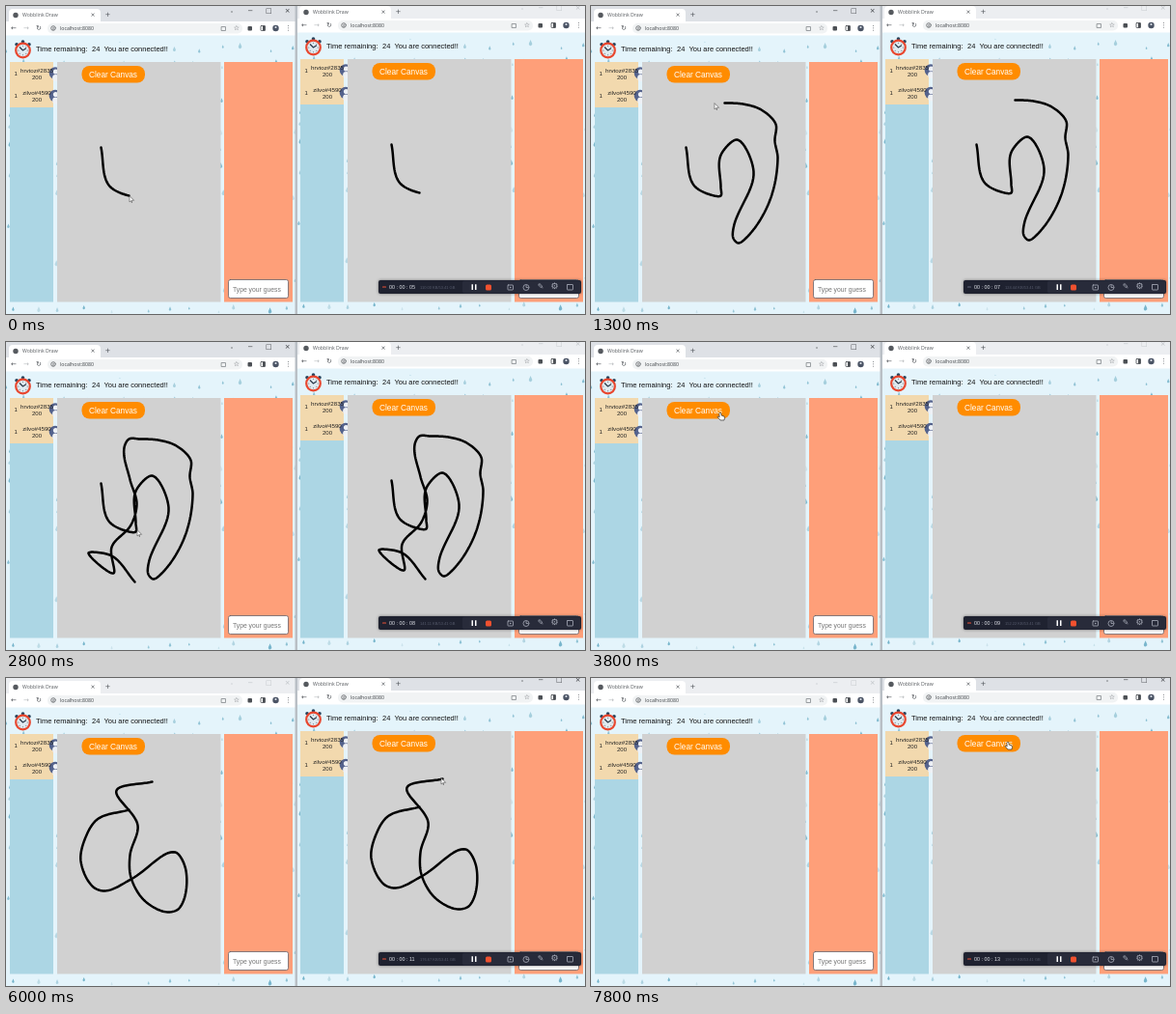
An HTML page with a canvas that plays this animation: 600 px wide and 319 px high, repeating every 8 s.

```html
<!DOCTYPE html>
<html lang="en">
<head>
<meta charset="utf-8">
<title>Shared drawing</title>
<style>
  html, body { margin: 0; width: 100%; height: 100%; overflow: hidden; }
  canvas { display: block; }
</style>
</head>
<body>
<canvas id="stage" width="600" height="319"></canvas>
<script>
const c = document.getElementById('stage').getContext('2d');
const LOOP = 8000, STEP = 100;
const SWITCH = 4800;               // the second window takes over
const CLEARS = [3800, 7800];
const DX = 301, DY = -3;           // second window relative to the first
const BOTTOM = 306.5;              // panels of both windows end here
const ARIAL = '"Liberation Sans", sans-serif';
const UI = '"Open Sans", sans-serif';
const SYMBOLS = '"DejaVu Sans", sans-serif';

// Drawing helpers
function paint(fill, border, width = .8) {
  if (fill) { c.fillStyle = fill; c.fill(); }
  if (border) { c.strokeStyle = border; c.lineWidth = width; c.stroke(); }
}
function box(x, y, w, h, fill, r = 0, border) {
  c.beginPath();
  c.roundRect(x, y, w, h, r);
  paint(fill, border);
}
function disc(x, y, r, fill, border, width) {
  c.beginPath();
  c.arc(x, y, r, 0, 7);
  paint(fill, border, width);
}
function line(points, color, width) {
  c.beginPath();
  points.forEach(p => c.lineTo(...p));
  paint(null, color, width);
}
function text(s, x, y, size, color, font = ARIAL, align = 'left', base = 'alphabetic') {
  c.font = `${size}px ${font}`;
  c.fillStyle = color;
  c.textAlign = align;
  c.textBaseline = base;
  c.fillText(s, x, y);
}
function symbol(s, x, y, size, color) {
  text(s, x, y, size, color, SYMBOLS, 'center', 'middle');
}

// Linear interpolation over [time, ...values] keys
function ramp(keys, t) {
  const i = keys.findIndex(k => k[0] > t);
  if (i < 0) return keys.at(-1).slice(1);
  if (i === 0) return keys[0].slice(1);
  const a = keys[i - 1], b = keys[i], f = (t - a[0]) / (b[0] - a[0]);
  return a.slice(1).map((v, j) => v + (b[j + 1] - v) * f);
}

// A smooth pen stroke through a few points, traced by length.
// pace says when the pen passes a point: [time, point index].
function makeStroke(points, pace) {
  const SUB = 16;
  const pts = points.split(' ').map(p => p.split(',').map(Number));
  const chords = pts.slice(1).map(([x, y], i) => Math.hypot(x - pts[i][0], y - pts[i][1]));
  const unit = (i, d) => (pts[i + 1][d] - pts[i][d]) / chords[i];
  // The mean of both directions fades out at sharp turns, which keeps corners
  const tangent = (i, d) =>
    (unit(Math.max(i - 1, 0), d) + unit(Math.min(i, chords.length - 1), d)) / 2;
  const path = [pts[0]], len = [0];
  chords.forEach((chord, i) => {
    for (let k = 1; k <= SUB; k++) {
      const s = k / SUB, r = 1 - s;
      const p = [0, 1].map(d => {
        const a = pts[i][d], b = pts[i + 1][d];
        const a2 = a + tangent(i, d) * chord / 3, b2 = b - tangent(i + 1, d) * chord / 3;
        return r * r * r * a + 3 * r * r * s * a2 + 3 * r * s * s * b2 + s * s * s * b;
      });
      const q = path.at(-1);
      len.push(len.at(-1) + Math.hypot(p[0] - q[0], p[1] - q[1]));
      path.push(p);
    }
  });
  const keys = pace.map(([t, i]) => [t, len[i * SUB]]);
  return t => {
    const [end] = ramp(keys, t);
    return path.filter((_, i) => len[i] <= end + .01);
  };
}

const firstStroke = makeStroke(
  '99,147 107,186 128,197 135,197 135,188 135,155 152,139 169,172 148,231 148,241 ' +
  '153,246 161,241 185,204 194,158 191,140 192,123 177,108 158,102 139,101 128,101 ' +
  '123,110 129,143 136,168 130,190 110,213 112,240 86,219 110,222 134,249',
  [[60, 2], [900, 14], [1300, 18], [2450, 28]]);

const secondStroke = makeStroke(
  '128,137 95,147 82,168 78,190 91,217 103,221 130,209 176,181 187,200 180,239 ' +
  '168,243 144,231 130,207 129,184 137,153 115,117 152,108',
  [[SWITCH - 50, 0], [5200, 5], [6000, 16]]);

function ink(t) {
  if (t < CLEARS[0]) return firstStroke(t);
  return t >= SWITCH && t < CLEARS[1] ? secondStroke(t) : [];
}

// The pointer runs a little ahead of the ink, then heads for the button
function pointer(t) {
  if (t < 2600) return firstStroke(t + 50).at(-1);
  if (t < SWITCH) return ramp([[2700, 134, 249], [2800, 136, 195], [3300, 134, 73],
    [4000, 134, 73], [4600, 429, 134]], t);
  if (t < 6000) {
    const [x, y] = secondStroke(t + 70).at(-1);
    return [x + DX, y + DY];
  }
  return ramp([[6000, 451, 104], [6800, 468, 98], [7400, 432, 66]], t);
}

function drawPointer(t) {
  const [x, y] = pointer(t);
  const over = [0, 1].some(k =>
    Math.abs(x - k * DX - 111) < 33 && Math.abs(y - k * DY - 71) < 9);
  const outline = over
    ? 'M-1 1Q0-1 1 1V3L4 4Q5 5 4 8H0L-3 4.5Q-2 3.5-1 4.5Z'
    : 'M0 0V6L1.500 4.700L2.500 6.800L2.500 4.300H4.200Z';
  c.save();
  c.translate(x, y);
  c.fillStyle = '#fff';
  c.strokeStyle = over ? '#333' : '#666';
  c.lineWidth = .7;
  c.fill(new Path2D(outline));
  c.stroke(new Path2D(outline));
  c.restore();
}

function drawDrops() {
  let seed = 7;
  const random = () => (seed = seed * 16807 % 2147483647) / 2147483647;
  for (let y = 40; y < 330; y += 17) for (let x = 0; x < 300; x += 26) {
    const px = x + random() * 20, py = y + random() * 8, r = .8 + random();
    c.beginPath();
    c.arc(px, py, r, -.3, Math.PI + .3);
    c.lineTo(px, py - 2.5 * r);
    c.closePath();
    paint(`hsl(196 45% ${62 + random() * 25}%)`);
  }
}

function drawBrowserBar(active) {
  const dark = '#4b4f54', control = active ? '#3c3f43' : '#bfc3c7';
  box(0, 0, 300, 17, active ? '#dee1e6' : '#eceef1');
  box(3, 3, 95, 14, '#fff', [4, 4, 0, 0]);
  disc(10, 9.5, 2.7, '#55595e');
  text('Wobblink Draw', 17, 11.4, 5.2, '#55595d', UI);
  symbol('×', 90, 9.5, 6, dark);
  symbol('+', 105.5, 9.5, 7, dark);
  [...'ˇ−□×'].forEach((s, i) => symbol(s, 234 + i * 19.2, i ? 5.5 : 9, 7, control));

  box(0, 16, 300, 14.5, '#fff');
  box(43, 18, 202, 10.5, '#f1f3f4', 5);
  [...'←→↻'].forEach((s, i) => symbol(s, 8 + i * 13, 23, 7, i === 1 ? '#b6b9bc' : dark));
  disc(49, 23, 2.3, null, dark, .7);
  line([[49, 22], [49, 24.5]], dark, .7);
  text('localhost:8080', 56, 25.1, 5.2, '#3c4045', UI);
  box(223.5, 21.5, 4, 4, null, 0, '#85898d');
  symbol('☆', 239, 23, 7, dark);
  box(250.5, 21, 4.5, 4.5, dark, 1);
  box(264, 20.5, 4.5, 5, null, .5, dark);
  box(266, 20.5, 2.5, 5, dark);
  disc(279.5, 23, 3.2, '#4a5364');
  disc(279.5, 22, 1.1, '#dce0e8');
  symbol('⋮', 292.5, 23, 7, dark);
}

function drawStopwatch() {
  const x = 17.5, y = 46;
  [-.8, 0, .8].forEach(a => disc(x + 9 * Math.sin(a), y - 9 * Math.cos(a), 1.8, '#26435c'));
  disc(x, y, 7.3, '#dfeaf0', '#e8472f', 2.2);
  for (let a = 0; a < 6; a += Math.PI / 4)
    disc(x + 4.7 * Math.cos(a), y + 4.7 * Math.sin(a), .5, '#55606a');
  line([[x - 3, y - 3], [x, y], [x + 3, y - 2]], '#2a3a4a', 1.2);
}

function drawPlayer(name, y) {
  disc(51, y, 6.3, '#54628c');
  disc(51.5, y - 1.5, 2.6, '#eef1f6');
  disc(51.5, y + 5, 3.4, '#eef1f6');
  text('1', 8.5, y + 2, 6, '#222');
  text(name, 32, y - 1, 6.2, '#222', ARIAL, 'center');
  text('200', 32, y + 6, 6, '#222', ARIAL, 'center');
}

function drawWindow(k, active, points) {
  const bottom = BOTTOM - k * DY, height = bottom - 58;
  c.save();
  c.translate(k * DX, k * DY);
  c.beginPath();
  c.rect(0, 0, 300, 330);
  c.clip();
  box(0, 30, 300, 300, '#e4f4fb');
  drawDrops();
  drawBrowserBar(active);
  box(28, 38, 142, 15, '#e4f4fb');
  drawStopwatch();
  text('Time remaining:', 31, 47, 7.5, '#111');
  text('24', 89, 47, 7.5, '#111');
  text('You are connected!!', 101.5, 47, 7.5, '#111');

  box(4, 58, 45, height, '#acd6e4');
  box(4, 58, 45, 47, '#f2d9ae');
  ['hrvtoz#2835', 'zilvo#4590'].forEach((name, i) => drawPlayer(name, 69.5 + i * 23.5));
  box(53, 58, 169.5, height, '#d1d1d1');
  box(226, 58, 71, height, '#fe9f79');
  box(78.5, 62, 65.5, 17.5, '#ff8c00', 8);
  text('Clear Canvas', 111, 73.7, 8.25, '#fff', ARIAL, 'center');
  box(230.5, bottom - 23, 62, 19, '#fff', 2, '#66626a');
  text('Type your guess', 235, bottom - 11, 6.8, '#757575');

  c.translate(-.5, -.5);
  line(points, '#000', 2.5);
  c.restore();
}

function drawRecorder(t) {
  const clock = t / 1000 + 5.95, pale = '#a9adb9', y = 291;
  const seconds = String(Math.floor(clock)).padStart(2, '0');
  c.save();
  c.shadowColor = 'rgba(0,0,0,.5)';
  c.shadowBlur = 3;
  box(386, 284, 210, 14, '#1f2230', 2);
  c.restore();
  box(473, 284.5, 122, 13, '#282b3a', 2);
  line([[390.5, y], [393.5, y]], clock % 1 >= .45 ? '#ef5336' : '#62677a', 1.2);
  text(`00 : 00 : ${seconds}`, 397, y + 2.2, 5.4, '#e4e6ec');
  text(`${(t / 90 + 110).toFixed(2)} KB/53.41 GB`, 429, y + 1.6, 4, '#565b6c');
  [482.5, 486].forEach(x => box(x, y - 2.7, 1.5, 5.6, '#fff'));
  box(497, y - 2.5, 6, 6, '#f2512f', 1.5);
  box(520, y - 2, 5.5, 5, null, .5, pale);
  disc(522.8, y + .5, .8, pale);
  disc(539, y + .5, 3, null, pale);
  line([[539, y - 1.5], [539, y + .5], [540.5, y + .5]], pale);
  symbol('✎', 554, y, 8, pale);
  symbol('⚙', 568.5, y, 9, pale);
  box(581.5, y - 2.5, 6, 5.5, null, .5, pale);
}

function draw(t) {
  const points = ink(t), second = t >= SWITCH;
  c.lineCap = c.lineJoin = 'round';
  drawWindow(0, !second, points);
  drawWindow(1, second, points);
  box(299.5, 0, 2.5, 319, '#b9bfc5');
  drawRecorder(t);
  drawPointer(t);
}

function tick() {
  const t = performance.now() % LOOP;
  draw(Math.floor(t / STEP) * STEP);
  requestAnimationFrame(tick);
}
tick();
</script>
</body>
</html>
```
